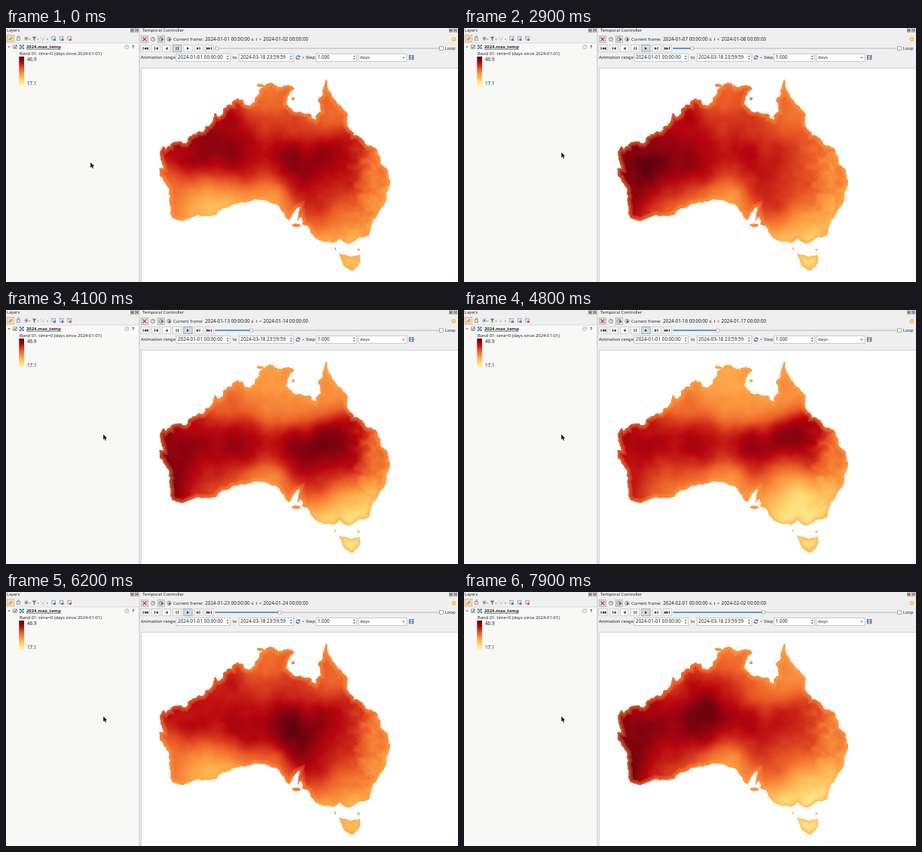
Recreate the animation shown at these times as an HTML page with a canvas. Size 600 by 338 pixels, loop 8 s.

```html
<!DOCTYPE html>
<html lang="en">
<head>
<meta charset="utf-8">
<title>Temporal Controller</title>
<style>
  html, body { margin: 0; width: 100%; height: 100%; overflow: hidden; background: #efefef; }
  canvas { display: block; width: 600px; height: 338px; }
</style>
</head>
<body>
<canvas id="stage" width="600" height="338"></canvas>
<script>
const ctx = document.getElementById('stage').getContext('2d');
const LOOP = 8000;
const FONT = '"Noto Sans", sans-serif';
const INK = '#232629', LINE = '#b4b6b8';
const clamp = (v, lo = 0, hi = 1) => Math.min(hi, Math.max(lo, v));
const mix = (a, b, k) => a + (b - a) * k;
const smooth = k => k * k * (3 - 2 * k);
const bell = k => Math.exp(-k * k);

let seed = 11;
const random = () => (seed = (seed * 16807) % 2147483647) / 2147483647;

// Headlands and bays; the fine coast between them is fractal.
const west = [209,157, 205,171, 209,187, 203,187, 211,206, 218,224, 218,247, 221,253, 234,257];
const south = [254,249, 279,249, 287,240, 300,235, 323,231, 340,229, 358,234, 371,252, 376,256, 390,238,
  387,257, 392,251, 393,261, 401,264, 405,273, 411,280, 433,286, 443,280, 455,287, 482,276];
const east = [485,262, 498,240, 505,225, 510,208, 507,190, 497,171, 488,159, 479,156, 473,147, 455,133,
  453,122, 445,104, 434,93, 425,68];
const north = [420,84, 418,111, 411,122, 393,113, 372,101, 383,80, 366,79, 348,74, 337,81, 327,100, 317,102,
  308,93, 289,107, 283,118, 278,113, 271,128, 262,138, 244,144, 222,152, 212,161];
const tasmania = [442,300, 456,304, 469,301, 470,310, 461,323, 455,321, 447,313];

function roughen(list, amount) {
  let points = [];
  for (let i = 0; i < list.length; i += 2) points.push([list[i], list[i + 1]]);
  for (let pass = 0; pass < 3; pass++) {
    points = points.flatMap((p, i) => {
      const q = points[i + 1];
      if (!q) return [p];
      const k = (random() - .5) * amount;
      return [p, [(p[0] + q[0]) / 2 + (q[1] - p[1]) * k, (p[1] + q[1]) / 2 - (q[0] - p[0]) * k]];
    });
  }
  return points;
}

const land = new Path2D();
function addShape(points) {
  points.forEach(([x, y], i) => i ? land.lineTo(x, y) : land.moveTo(x, y));
  land.closePath();
}
function addIsland(x, y, w, h) {
  addShape(Array.from({ length: 9 }, (_, i) => {
    const r = .7 + random() * .5, turn = i * Math.PI * 2 / 9;
    return [x + Math.cos(turn) * w * r, y + Math.sin(turn) * h * r];
  }));
}
addShape([...roughen(west, .3), ...roughen(south, .25), ...roughen(east, .35), ...roughen(north, .5)]);
addShape(roughen(tasmania, .35));
addIsland(386, 262.5, 6, 2);
addIsland(337, 76, 5, 2.2);
addIsland(381, 94, 2, 2);
addIsland(437, 294, 1, 2);
addIsland(468, 295, 2, 2);

// Regional heat (0 to 100) swings around a mean over a three-week cycle.
const CYCLE = 21;
const regions = [];
const region = (x, y, mean, swing = 0, quarter = 0) => regions.push({ x, y, parts: [mean, swing, quarter] });
region(345, 90, 50, 2, 10);
region(430, 98, 49, 5, 4);
region(288, 116, 66, 5, 16);
region(380, 128, 58, 9, 16);
region(245, 168, 84, -3, 2);
region(218, 222, 76, -22);
region(308, 180, 84, -4);
region(275, 236, 48, -19);
region(345, 232, 40);
region(395, 182, 90, 5, -8);
region(448, 178, 76, 4, -16);
region(420, 220, 68, 6, 8);
region(502, 195, 43);
region(450, 266, 32, 13, 4);
region(458, 310, 18, 8);

// Short-lived warm and cool spells on top of the cycle.
const spells = [];
const spell = (day, x, y, reach, heat) => spells.push({ day, x, y, reach, heat });
spell(0, 285, 150, 60, 15);
spell(2, 295, 205, 55, -22);
spell(6, 245, 205, 50, 14);
spell(12, 425, 205, 60, 16);
spell(15, 430, 240, 40, -22);
spell(22, 360, 210, 50, 16);
spell(31, 335, 135, 45, 22);

const MAP = { x: 200, y: 64, w: 314, h: 262 };
const SIZE = MAP.w * MAP.h;
const lattice = Float32Array.from({ length: 4096 }, () => random() * 2 - 1);
function noise(x, y) {
  const xi = Math.floor(x), yi = Math.floor(y), u = smooth(x - xi), v = smooth(y - yi);
  const at = (i, j) => lattice[((yi + j) & 63) * 64 + ((xi + i) & 63)];
  return mix(mix(at(0, 0), at(1, 0), u), mix(at(0, 1), at(1, 1), u), v);
}

// Blend the regions into one field each for mean, swing and quarter phase.
const [meanField, swingField, quarterField] = [0, 1, 2].map(() => new Float32Array(SIZE));
for (let p = 0; p < SIZE; p++) {
  const x = MAP.x + p % MAP.w, y = MAP.y + Math.floor(p / MAP.w);
  const sums = [0, 0, 0];
  let total = 0;
  for (const r of regions) {
    const w = bell(Math.hypot(x - r.x, y - r.y) / 36);
    total += w;
    r.parts.forEach((v, i) => { sums[i] += w * v; });
  }
  const ranges = smooth(clamp((x - 440) / 40)) * smooth(clamp((y - 120) / 50));
  const grain = noise(x / 20, y / 20) * 4 + noise(x / 8, y / 8) * (1 + 4 * ranges)
    + noise(x / 3, y / 3) * (.5 + 1.5 * ranges);
  meanField[p] = sums[0] / total + grain;
  swingField[p] = sums[1] / total;
  quarterField[p] = sums[2] / total;
}

const ramp = [[255,255,190], [254,217,115], [253,160,68], [234,91,38], [183,6,15], [84,0,15]];
function rampColor(v) {
  const s = clamp(v / 100) * 5, i = Math.min(4, Math.floor(s));
  return ramp[i].map((c, n) => mix(c, ramp[i + 1][n], s - i));
}
const palette = Array.from({ length: 401 }, (_, i) => rampColor(i / 4));

const raster = document.createElement('canvas');
raster.width = MAP.w;
raster.height = MAP.h;
const rasterCtx = raster.getContext('2d');
const pixels = rasterCtx.createImageData(MAP.w, MAP.h);
let paintedDay = -1;

function paintRaster(day) {
  if (day === paintedDay) return;
  paintedDay = day;
  const phase = day / CYCLE * Math.PI * 2, c = Math.cos(phase), s = Math.sin(phase);
  const active = spells.map(e => ({ ...e, heat: e.heat * bell((day - e.day) / 1.8) }))
    .filter(e => Math.abs(e.heat) > .3);
  for (let p = 0; p < SIZE; p++) {
    const x = MAP.x + p % MAP.w, y = MAP.y + Math.floor(p / MAP.w);
    let v = meanField[p] + swingField[p] * c + quarterField[p] * s;
    for (const e of active) v += e.heat * bell(Math.hypot(x - e.x, y - e.y) / e.reach);
    const [r, g, b] = palette[Math.round(clamp(v, 0, 100) * 4)];
    pixels.data[p * 4] = r;
    pixels.data[p * 4 + 1] = g;
    pixels.data[p * 4 + 2] = b;
    pixels.data[p * 4 + 3] = 255;
  }
  rasterCtx.putImageData(pixels, 0, 0);
}

function rect(x, y, w, h, fill, stroke) {
  ctx.fillStyle = fill;
  ctx.fillRect(x, y, w, h);
  if (!stroke) return;
  ctx.strokeStyle = stroke;
  ctx.lineWidth = .7;
  ctx.strokeRect(x, y, w, h);
}
function text(str, x, y, size = 5.8, style = '') {
  ctx.font = `${style} ${size}px ${FONT}`;
  ctx.fillStyle = INK;
  ctx.fillText(str, x, y);
}
function poly(fill, ...points) {
  ctx.fillStyle = fill;
  ctx.beginPath();
  for (let i = 0; i < points.length; i += 2) ctx.lineTo(points[i], points[i + 1]);
  ctx.closePath();
  ctx.fill();
}
function stroke(color, width, ...points) {
  ctx.strokeStyle = color;
  ctx.lineWidth = width;
  ctx.beginPath();
  for (let i = 0; i < points.length; i += 2) ctx.lineTo(points[i], points[i + 1]);
  ctx.stroke();
}
function circle(x, y, r, color, fill) {
  ctx.beginPath();
  ctx.arc(x, y, r, 0, 7);
  ctx.lineWidth = .8;
  ctx.strokeStyle = ctx.fillStyle = color;
  fill ? ctx.fill() : ctx.stroke();
}
function clock(x, y, color = '#777') {
  circle(x, y, 2.6, color);
  stroke(color, .7, x, y - 1.8, x, y, x + 1.3, y);
}
function cross(x, y, r, color, width) {
  stroke(color, width, x - r, y - r, x + r, y + r);
  stroke(color, width, x - r, y + r, x + r, y - r);
}
const down = (x, y, r = 1.4) => poly('#444', x - r, y - r / 2, x + r, y - r / 2, x, y + r / 2 + .3);
const up = (x, y, r = 1.4) => poly('#444', x - r, y + r / 2, x + r, y + r / 2, x, y - r / 2 - .3);
function dockButtons(x) {
  for (const cx of [x, x + 6]) rect(cx - 2, 1, 4.2, 4.2, '#ddd', '#777');
  rect(x - .8, 2.4, 1.7, 1.7, '#fff', '#555');
  cross(x + 6.1, 3.1, 1.2, '#333', .8);
}
function field(x, w, label, size) {
  rect(x, 34.3, w, 10, '#fff', LINE);
  text(label, x + 2, 41.4, size);
}
function spinner(x, w, label, size) {
  field(x, w, label, size);
  up(x + w - 3.5, 37.5);
  down(x + w - 3.5, 41.3);
}

function drawLayerTools() {
  rect(1.3, 9.5, 9.5, 9, '#f0dcc3', '#c9b090');
  poly('#e8a23a', 3, 15.5, 7.5, 11.5, 9, 13.5, 5, 17);
  rect(14.5, 12.5, 4, 4, '#ddd', '#888');
  stroke('#666', .8, 15, 11, 18, 11);
  circle(27, 14, 2.2, '#888');
  circle(27, 14, 1, '#555', true);
  poly('#6d7680', 34.8, 11.5, 40.2, 11.5, 38.2, 14.4, 38.2, 17.2, 36.8, 16.4, 36.8, 14.4);
  stroke('#bbb', .8, 46, 12, 49, 16.5, 51.5, 12);
  for (const x of [31.5, 42.5, 55]) down(x, 15, 1);
  for (const x of [63, 73.5, 84]) {
    rect(x - 2.2, 11.5, 4.6, 4.5, '#e8e8e8', '#8793a0');
    poly(x > 80 ? '#d9534f' : '#3c82c4', x, 14.3, x + 3, 14.3, x + 3, 17, x, 17);
  }
}

function drawLayers() {
  rect(0, 20, 176.5, 318, '#f8f8f7');
  stroke('#d0d0d0', .7, 0, 20, 176.5, 20);
  stroke('#c4c4c4', 1, 177, 0, 177, 338);
  text('Layers', 1, 5.3, 5.6);
  dockButtons(167.5);
  drawLayerTools();

  down(4, 25.3, 1.5);
  rect(9.7, 22.8, 4.6, 4.6, '#fff', '#777');
  stroke(INK, .9, 10.5, 25, 11.8, 26.5, 13.8, 23.3);
  for (let i = 0; i < 9; i++)
    rect(18 + i % 3 * 2, 22.3 + Math.floor(i / 3) * 2, 1.8, 1.8, i % 2 ? '#b8cbe0' : '#2d5f9b');
  text('2024.max_temp', 27, 27.2, 5.9, 'bold');
  stroke(INK, .6, 27, 28.3, 73, 28.3);
  clock(160.3, 25.2, '#aaa');
  text('?', 167.6, 27.3, 5.6, 'bold');
  text('Band 01: time=0 (days since 2024-01-01)', 18, 36, 5.8);
  const legend = ctx.createLinearGradient(0, 38, 0, 78);
  ramp.forEach((c, i) => legend.addColorStop(1 - i / 5, `rgb(${c})`));
  rect(17.3, 38, 6.7, 40, legend);
  text('46.9', 28, 44.2, 6.3);
  text('17.1', 28, 76.2, 6.3);
}

// Each glyph is spelled with bars and arrows, left to right.
const glyphs = ['|<<', '|<', '<', '||', '>', '>|', '>>|'];
function drawTransport(playing) {
  glyphs.forEach((glyph, i) => {
    const x = 184.7 + i * 14.22;
    const active = glyph === (playing ? '>' : '||');
    rect(x - 5.7, 22.6, 11.2, 9.2, active ? '#d2dbe4' : '#f8f8f8', active ? '#7a93ad' : '#c0c2c4');
    [...glyph].forEach((mark, n) => {
      const cx = x + (n - (glyph.length - 1) / 2) * 2.6, dir = mark === '>' ? 1.5 : -1.5;
      if (mark === '|') rect(cx - .5, 25.2, 1, 4, '#333');
      else poly('#333', cx - dir, 25.2, cx + dir, 27.2, cx - dir, 29.2);
    });
  });
}

function drawSlider(day) {
  const knob = 280 + day * 3.8;
  rect(277.5, 26.4, 297.5, 1.5, '#c9cbcd');
  rect(277.5, 26.4, knob - 277.5, 1.5, '#3584d4');
  rect(knob - 2, 25.1, 4, 4, '#fafafa', '#aaa');
  rect(575.5, 24.8, 4.8, 4.8, '#fff', '#888');
  text('Loop', 582.7, 29.4, 5.9);
}

function drawRange() {
  text('Animation range', 179, 41.4, 5.85);
  spinner(226, 71.7, '2024-01-01 00:00:00', 6.35);
  text('to', 301, 41.4);
  spinner(309.3, 72.6, '2024-03-18 23:59:59', 6.35);
  for (const turn of [0, Math.PI]) {
    ctx.save();
    ctx.translate(387.6, 39.2);
    ctx.rotate(turn);
    ctx.strokeStyle = '#3873a8';
    ctx.lineWidth = 1.1;
    ctx.beginPath();
    ctx.arc(0, 0, 2.2, .3, 2.7);
    ctx.stroke();
    poly('#3873a8', 1.2, -3.1, 3.4, -.6, .5, -.3);
    ctx.restore();
  }
  down(394.5, 39.4, 1.2);
  text('Step', 398, 41.4, 5.9);
  spinner(411.7, 54, '1.000', 6.2);
  field(468, 64, 'days', 5.9);
  down(527.7, 39.4, 1.5);
  rect(535.3, 36.4, 5.5, 5.5, '#5d89b8', '#3d5f87');
  for (const y of [36.7, 39.7]) rect(536.6, y, 2.8, 1.9, '#e0e9f1');
}

const isoDay = i => new Date(Date.UTC(2024, 0, 1 + i)).toISOString().slice(0, 10) + ' 00:00:00';

function drawController(day, playing) {
  text('Temporal Controller', 181, 5.3, 5.9);
  dockButtons(590.5);

  for (const x of [179.5, 201.3]) rect(x, 10.3, 9.2, 9.2, '#dedede', '#aaa');
  cross(184, 14.9, 2.5, '#c8322f', 1.3);
  for (const x of [195, 205.7, 216.5]) clock(x, 14.9);
  for (const x of [206.5, 216]) poly('#555', x, 13.5, x + 3, 15.4, x, 17.3);
  circle(594.5, 14.8, 2.9, '#f1c44c', true);
  circle(594.5, 14.8, 1.1, '#fff1bd', true);

  text('Current frame:', 222, 17.2, 5.75);
  text(isoDay(day), 264.2, 17.2, 6.3);
  text('≤', 325.5, 17.2, 6);
  text('t', 331.6, 17.2, 6, 'italic');
  text('<', 335.8, 17.2, 6);
  text(isoDay(day + 1), 341.6, 17.2, 6.3);

  drawTransport(playing);
  drawSlider(day);
  drawRange();
}

function drawMap(day) {
  rect(179.5, 53.5, 422, 286, '#fff', '#c4c4c4');
  paintRaster(day);
  ctx.save();
  ctx.clip(land);
  ctx.drawImage(raster, MAP.x, MAP.y);
  // Sea breeze: a slightly cooler rim along the shore.
  ctx.strokeStyle = 'rgba(253, 165, 75, .22)';
  for (const width of [3, 7, 11]) {
    ctx.lineWidth = width;
    ctx.stroke(land);
  }
  ctx.restore();
}

function drawPointer(t) {
  const k = smooth(clamp((t - 100) / 800));
  ctx.save();
  ctx.translate(mix(112.2, 129.2, k), mix(178.8, 165.4, k));
  const shape = [0, 0, 0, 7.2, 1.6, 5.7, 2.7, 8.3, 3.9, 7.8, 2.8, 5.3, 5, 5.2];
  stroke('#fff', 1.2, ...shape, 0, 0);
  poly('#111', ...shape);
  ctx.restore();
}

function frame() {
  const t = performance.now() % LOOP;
  const day = t < 1500 ? 0 : Math.max(1, Math.floor((t - 1535) / 205));
  rect(0, 0, 600, 338, '#efefef');
  drawLayers();
  drawController(day, t >= 1200);
  drawMap(day);
  drawPointer(t);
  requestAnimationFrame(frame);
}
frame();
</script>
</body>
</html>
```
